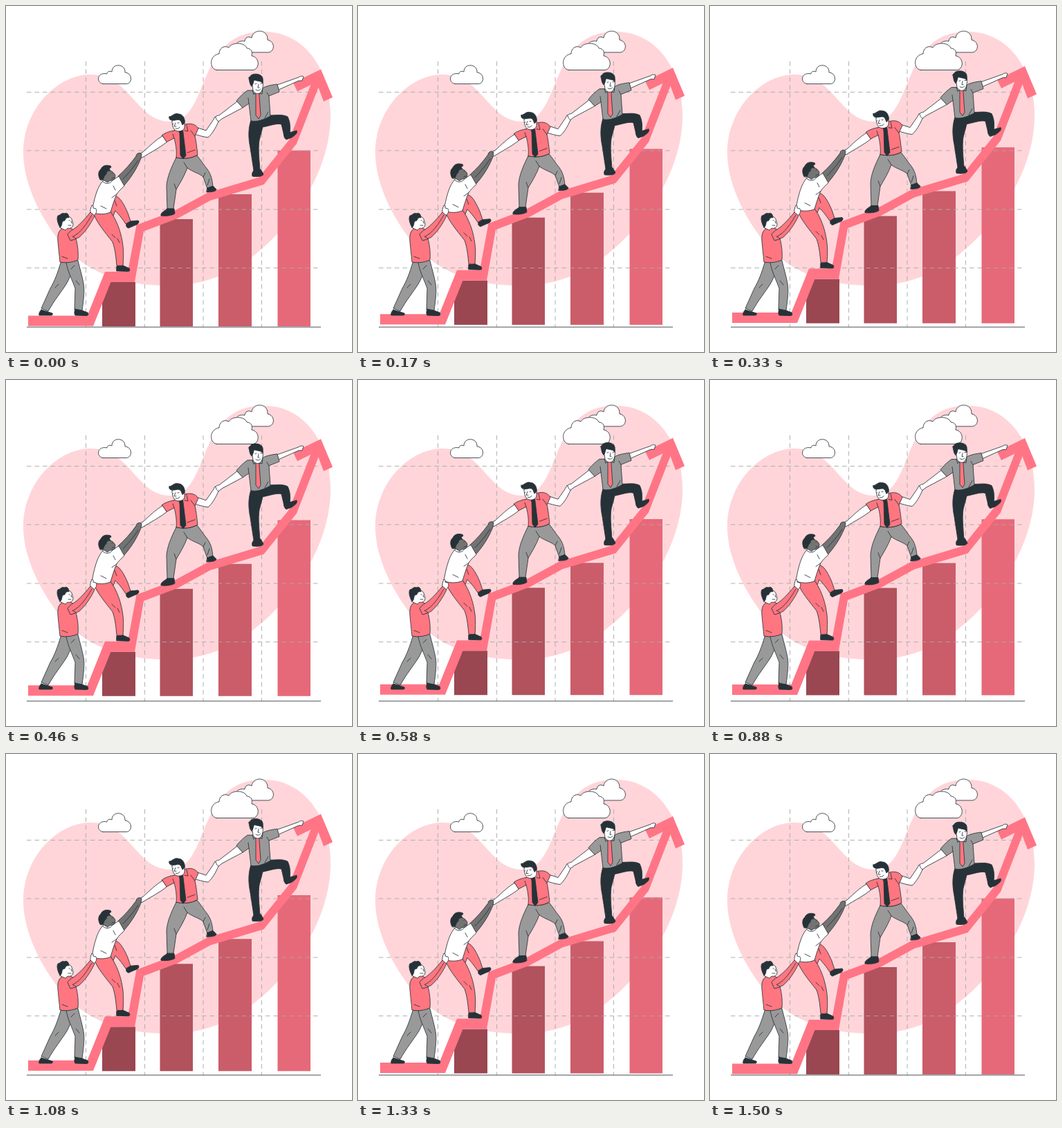
An HTML page for the animation above (1.54 s loop, 500 px wide and 500 px high).

```html
<!DOCTYPE html>
<html lang="en">
<head>
<meta charset="utf-8">
<title>Climbing the chart</title>
<style>
  html, body { margin: 0; width: 100%; height: 100%; overflow: hidden; background: #fff; }
  svg { display: block; width: 100%; height: 100%; }
  .climb { transform: translateY(var(--shift, 0)); }
  .grid { fill: none; stroke: #a9a9a9; stroke-width: .9; stroke-dasharray: 6.5 5; }
  .ink { stroke: #263238; stroke-width: .85; stroke-linejoin: round; stroke-linecap: round; }
  .line { fill: none; }
  .white { fill: #fff; }
  .red { fill: #ff7680; }
  .grey { fill: #999; }
  .shade { fill: #777; stroke: none; }
  .brown { fill: #737373; }
  .dark { fill: #263238; }
  .arrow { fill: #ff7586; }
</style>
</head>
<body>
<svg viewBox="0 0 500 500">
  <path fill="#ffd5d9" d="M25 212C25 148 75 99 122 99C180 99 188 167 237 167C296 167 272 37 372 37C432 37 469 92 469 158C469 230 425 309 355 363C320 390 280 404 235 404C165 404 115 384 80 343C56 314 25 262 25 212Z"/>

  <g class="climb">
    <path fill="#9a4752" d="M139 399h48v64h-48z"/>
    <path fill="#b1525d" d="M222.500 308h47.500v155h-47.500z"/>
    <path fill="#cb5d6a" d="M307 272h48v191h-48z"/>
    <path fill="#e66979" d="M392.500 208.700h47.500v254.300h-47.500z"/>
  </g>

  <path class="grid" d="M115.500 80V464M200.500 80V464M285 80V464M369.500 80V464M30 124.500H455M30 209H455M30 294H455M30 378.500H455"/>
  <path d="M30 464H455" stroke="#4a4f52" stroke-width="1.2"/>

  <g class="ink white">
    <path d="M340 67H379C389 66 389 51 378 49C379 33 357 32 355 46C350 43 345 46 345 51C331 48 327 63 340 67Z"/>
    <path d="M304 92.500H357C367 91 367 74 355 72C357 65 353 61 348 61C345 52 326 52 322 60C314 56 308 62 308 69C294 71 293 90 304 92.500Z"/>
    <path d="M140 112.500H174C183 112 183 97 172 96C173 83 153 82 153 95C148 93 146 96 146 98C131 95 130 111 140 112.500Z"/>
  </g>

  <g class="climb">
    <path class="arrow" d="M32 447.500H117.500L143 384H176L188.500 316.500L243 296L291 270L365.500 247.500L409.500 193L445 102L456 106L420 199L372.500 258L295.500 281L248 307L199 325.500L186 399H151.500L126 462.500H32Z"/>
    <path class="arrow" d="M455 91.500L472 132L459 138L448.500 110L421 123.500L415 111Z"/>

    <!-- Leader in the grey shirt -->
    <g class="ink">
      <path class="white" d="M392 114L423 103C425 101 428 101 430 102L428 108L423 108L394 121Z"/>
      <path class="white" d="M334 138L308 158C304 158 301 161 302 165L307 167L312 163L342 147Z"/>
      <path class="dark" d="M354 165C350 177 350 190 353 205L358 238L367 237C366 222 364 207 366 194L371 175C381 173 392 169 398 171L402 188L410 185C411 176 411 168 407 160C399 156 390 158 381 158Z"/>
      <path class="dark" d="M402 184C407 184 413 182 420 180C422 184 417 187 413 190L405 193C402 191 401 187 402 184Z"/>
      <path class="dark" d="M358 238L368 236L372 243C371 247 361 247 356 246C355 242 356 240 358 238Z"/>
      <path class="grey" d="M356 122L349 122C343 126 338 131 333 137L342 147L351 141L354 166C363 168 373 164 382 159L380 130L395 124L392 113C385 114 377 115 370 119Z"/>
      <path class="line" d="M351 141L350 133M380 130L377 125M374 162L379 153M363 122L358 128L356 122M364 126L370 127L371 119"/>
      <path class="red" d="M361 125L366 125L366 130L368 158L365 163L361 158L361 130Z"/>
      <path class="white" d="M355 108L357 122C359 127 365 128 368 125C371 121 372 115 371 108L364 105Z"/>
      <path class="dark" d="M355 116C352 114 352 108 351 105C350 102 354 102 354 100C359 97 367 98 370 102C372 105 371 109 371 112C369 108 364 109 359 107C357 109 358 113 355 116Z"/>
      <path class="line" d="M365 113L364 118L366 118M360 113L362 112M368 112L370 112M361 121C364 123 366 122 368 120"/>
    </g>

    <!-- Climber in the red shirt -->
    <g class="ink">
      <path class="white" d="M274 175L289 180L300 164L302 160C304 160 303 164 305 165L307 167C303 176 298 185 292 190C285 189 278 187 272 185Z"/>
      <path class="grey" d="M246 219C238 235 233 247 232 260L233 293L242 293L246 265C252 255 258 245 262 234C270 240 280 242 285 247L291 264L299 261C298 250 296 243 291 236C286 230 281 222 276 216C266 221 256 221 246 219Z"/>
      <path class="line" d="M262 234L257 226M285 247L288 241M246 265L243 257M291 259L294 250"/>
      <path class="dark" d="M233 293L243 293L244 300C240 303 230 304 224 303C223 299 228 297 233 293Z"/>
      <path class="dark" d="M291 263L299 260L304 265C304 268 296 269 290 269Z"/>
      <path class="red" d="M243 180L259 171C268 169 274 171 278 177L273 188C275 196 276 208 277 215C267 221 256 221 246 219C247 208 245 198 243 191L231 197L225 187C230 183 237 181 243 180Z"/>
      <path class="line" d="M243 191L241 185M273 188L267 180M262 212L273 208M249 178L251 184L255 180M258 180L263 181L261 172"/>
      <path class="dark" d="M250 178L255 177L256 183L260 216L256 221L252 216L251 183Z"/>
      <path class="white" d="M226 188C217 193 208 202 198 211L194 213C190 214 189 217 191 220L197 219C208 212 222 205 232 197Z"/>
      <path class="white" d="M240 166C240 175 243 181 249 181C254 181 258 179 258 174L258 165C254 159 245 162 240 166Z"/>
      <path class="dark" d="M236 160C240 160 243 154 249 156C255 156 259 162 258 169L255 172L253 167C250 162 246 166 240 165C237 165 235 163 236 160Z"/>
      <path class="line" d="M245 169L243 174L246 174M242 170L241 171M248 169L250 169M245 177C248 178 250 177 251 175"/>
    </g>

    <!-- Climber in the white shirt -->
    <g class="ink">
      <path class="brown" d="M162 246C171 238 180 228 188 217C188 213 193 211 196 214L195 220C191 230 185 243 171 259Z"/>
      <path class="line" d="M169 250C178 241 186 231 191 223"/>
      <path class="red" d="M151 298C152 288 155 277 159 275C166 277 172 290 176 299L180 311L173 315C168 307 162 300 158 296L155 303Z"/>
      <path class="red" d="M126 299C131 313 143 327 154 341C158 352 159 365 160 375L169 376C170 362 170 350 168 340C166 328 162 316 156 305L151 297Z"/>
      <path class="line" d="M157 281L160 289M153 330L158 335M164 342L161 336"/>
      <path class="dark" d="M174 315L180 311L191 310C194 313 190 316 186 317L177 321C174 320 173 318 174 315Z"/>
      <path class="dark" d="M160 376L169 375L178 379C180 383 178 383.500 175 383.500L160 383Z"/>
      <path class="white" d="M141 252C133 259 128 275 124 298C134 302 144 301 151 298C154 288 157 278 160 272C163 267 167 264 171 260L163 246L155 251Z"/>
      <path class="line" d="M158 266L155 260M160 272L153 277M139 253C144 258 150 258 155 251M137 289L145 293"/>
      <path class="brown" d="M143 240C150 235 156 240 158 245L157 250C154 253 150 251 147 255L140 251Z"/>
      <path class="dark" d="M136 251C132 244 134 238 137 236C139 231 144 229 151 231C153 233 151 234 149 235L151 238C147 237 145 240 145 243C142 244 142 248 140 251Z"/>
      <path class="line" d="M153 242L154 241M153 249L156 248"/>
    </g>
  </g>

  <!-- Supporter standing still at the bottom -->
  <g class="ink">
    <path class="grey" d="M79 371C75 385 70 398 64 408L51 437L61 441C70 425 80 413 87 402C93 392 96 382 96 370Z"/>
    <path class="grey" d="M87 371C89 383 96 397 100 408L99 439L110 440C112 425 114 410 112 401C110 390 107 380 104 368Z"/>
    <path class="line" d="M99 375L94 380M106 403L101 397M71 407L76 402"/>
    <path class="dark" d="M51 439L61 442L67 444C68 447 66 447 64 447L48 447C47 444 49 441 51 439Z"/>
    <path class="dark" d="M100 438L110 440L118 443C120 447 118 447.500 115 447.500L100 447C98 444 99 441 100 438Z"/>
    <path class="red" d="M82 321C76 324 74 331 75 340C76 352 77 360 78 370C88 372 97 370 104 367C105 355 103 343 101 336L98 324L92 320Z"/>
    <path class="white" d="M122 299C121 295 123 291 124 288L126 289L126 292L130 293C132 297 130 300 127 303Z"/>
    <path class="red" d="M95 324C103 320 113 309 122 298L128 303C122 316 114 327 106 334C101 337 97 338 93 339L89 330Z"/>
    <path class="line" d="M97 333C108 328 117 314 124 302M81 362L89 365M101 336L96 333"/>
    <path class="white" d="M82 307C86 303 93 303 95 308L97 315C97 320 93 322 89 321L86 324L79 321C78 315 79 310 82 307Z"/>
    <path class="dark" d="M78 320C74 313 73 306 75 303C79 302 81 298 84 300C88 298 91 301 91 306C88 305 86 307 85 310L82 311C80 314 82 317 78 320Z"/>
    <path class="line" d="M91 310L92 310M94 311L95 314M90 317L94 317"/>
  </g>
</svg>
<script>
  const LOOP = 1540, PERIOD = 1500, RISE = 10, LEAD = 30;
  const stage = document.querySelector('svg');

  // Constant-speed rise and fall.
  function height(ms) {
    const phase = ((ms + LEAD) % PERIOD) / PERIOD;
    return RISE * (1 - Math.abs(2 * phase - 1));
  }

  function draw(now) {
    const time = Math.min(now % LOOP, PERIOD);
    stage.style.setProperty('--shift', `${height(0) - height(time)}px`);
    requestAnimationFrame(draw);
  }
  draw(performance.now());
</script>
</body>
</html>
```
